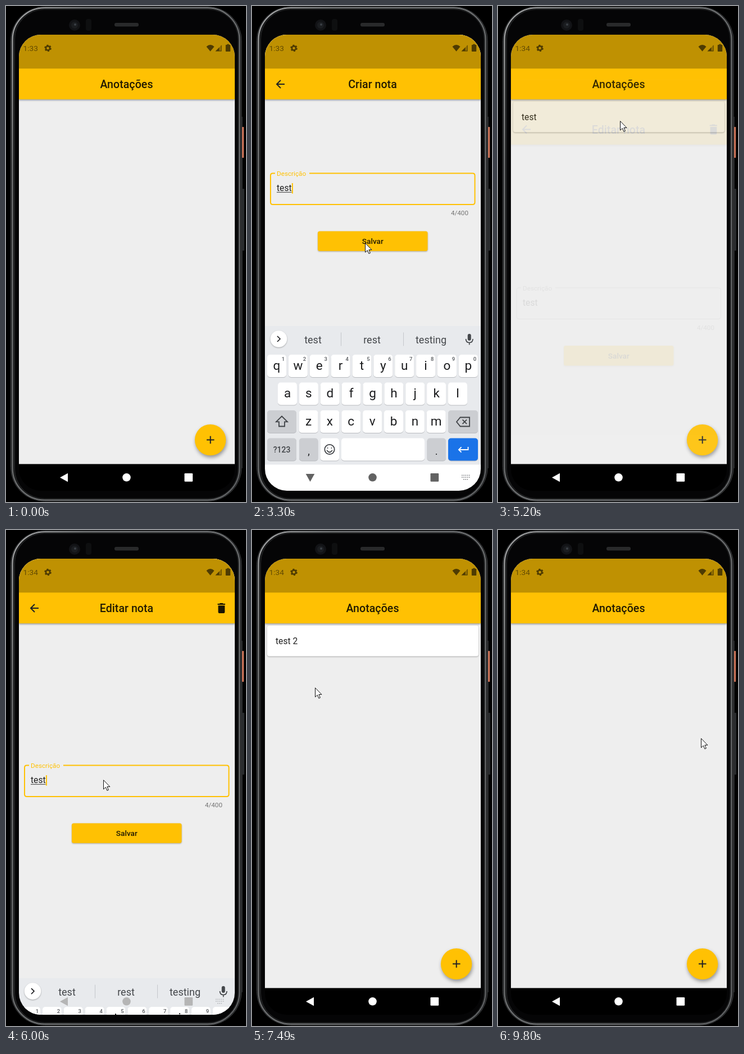
Animation of 427 by 882 pixels, one loop 9.88 s. Source, as an HTML page:

```html
<!DOCTYPE html>
<html lang="pt">
<head>
<meta charset="utf-8">
<title>Anotações</title>
<style>
  html, body { margin: 0; width: 100%; height: 100%; overflow: hidden; background: #000; }
  svg { display: block; width: 100%; height: 100%; font-family: Roboto, "Noto Sans", sans-serif; }
  filter { color-interpolation-filters: sRGB; }
  .title { font-size: 19.5px; font-weight: 500; letter-spacing: .08px; text-anchor: middle; fill: #231b02; }
  .body { font-size: 15.63px; fill: #222; }
  .small { font-size: 11.7px; fill: #757575; text-anchor: end; }
  .amber { fill: #ffc103; }
  .line { fill: none; stroke: #202124; stroke-width: 2; }
  .key { font-size: 22.5px; text-anchor: middle; fill: #1b1c1e; }
  .digit { font-size: 9.5px; font-weight: 500; text-anchor: middle; fill: #55585c; }
  .hint { font-size: 18px; text-anchor: middle; fill: #44474b; }
</style>
</head>
<body>
<svg viewBox="0 0 427 882" xmlns="http://www.w3.org/2000/svg">
  <defs>
    <clipPath id="screen"><rect x="23" y="51" width="384" height="811" rx="39"/></clipPath>
    <clipPath id="content"><rect x="23" y="51" width="384" height="763.5"/></clipPath>
    <filter id="low" x="-10%" y="-20%" width="120%" height="160%">
      <feDropShadow dx="0" dy="1" stdDeviation="1.2" flood-opacity=".3"/>
    </filter>
    <filter id="bar" x="-5%" y="-10%" width="110%" height="130%">
      <feDropShadow dx="0" dy="1.6" stdDeviation="1.7" flood-opacity=".36"/>
    </filter>
    <filter id="high" x="-30%" y="-30%" width="170%" height="170%">
      <feDropShadow dx="1.2" dy="3.6" stdDeviation="3" flood-opacity=".38"/>
    </filter>
    <linearGradient id="rim" x1="0" x2="1" y1="0" y2="1">
      <stop offset="0" stop-color="#b4b5b6"/><stop offset=".16" stop-color="#7d7f80"/>
      <stop offset="1" stop-color="#66686a"/>
    </linearGradient>
  </defs>

  <!-- Phone body -->
  <rect width="427" height="882"/>
  <rect x="419" y="197" width="2" height="625" fill="#222325"/>
  <rect x="420" y="215" width="3.2" height="55" rx="1" fill="#cb7358"/>
  <rect x="420" y="325" width="4" height="110" rx="1" fill="#292b2d"/>
  <rect x="8.5" y="1.5" width="410.5" height="879" rx="60" fill="#1c1d1e" stroke="#414345"/>
  <rect x="11.5" y="3.2" width="404" height="875.3" rx="57" fill="none" stroke="url(#rim)" stroke-width="2"/>
  <rect x="15.5" y="6" width="397.5" height="870" rx="53" fill="#050506" stroke="#232425"/>
  <circle cx="122" cy="34" r="10" fill="#121316"/>
  <circle cx="122" cy="34" r="6" fill="#1b1d20"/>
  <circle cx="123" cy="33" r="2" fill="#3a3f45"/>
  <rect x="142" y="23" width="10" height="21" rx="4" fill="#0e0f10"/>
  <rect x="193" y="30" width="43" height="6.5" rx="3" fill="#292a2b"/>

  <g clip-path="url(#screen)">
    <rect x="23" y="51" width="384" height="811"/>
    <g clip-path="url(#content)">
      <!-- List page -->
      <rect x="23" y="51" width="384" height="764" fill="#eee"/>
      <g id="card">
        <rect id="cardBox" x="27" y="170" width="376" height="54.5" rx="4" fill="#fff" filter="url(#low)"/>
        <text id="cardText" class="body" x="42" y="203"></text>
      </g>
      <rect class="amber" x="23" y="51" width="384" height="115" filter="url(#bar)"/>
      <text class="title" x="214.5" y="146">Anotações</text>
      <circle class="amber" cx="363.6" cy="771.6" r="27.7" filter="url(#high)"/>
      <path class="line" d="M357 771.5h13.5M363.7 764.8v13.5"/>

      <!-- Editor page -->
      <g id="editor">
        <rect x="23" y="51" width="384" height="764" fill="#eee"/>
        <rect class="amber" x="23" y="51" width="384" height="115" filter="url(#bar)"/>
        <path class="line" d="M58 139H44M51 132l-7 7 7 7"/>
        <text id="editorTitle" class="title" x="214.5" y="146"></text>
        <g id="trash">
          <circle id="trashInk" cx="383" cy="139" r="34" fill-opacity=".1"/>
          <path d="M376.5 133v-2h3.4l1-1h4.6l1 1h3.4v2zM377.5 134.3h11.8v11.7q0 2-2 2h-7.8q-2 0-2-2z" fill="#1a1502"/>
        </g>
        <g id="form">
          <path id="border" fill="none"/>
          <text id="label" x="0" y="0" font-size="15.63">Descrição</text>
          <text id="value" class="body" x="44" y="32.3" xml:space="preserve" style="white-space:pre"></text>
          <rect id="underline" y="33.7" height="1" fill="#333"/>
          <rect id="caret" y="18" width="2" height="18.5" class="amber"/>
          <text id="count" class="small" x="385" y="75.3"></text>
          <g id="save">
            <rect class="amber" x="117" y="103.5" width="195.5" height="35.3" rx="3.5" filter="url(#low)"/>
            <text x="214.8" y="126" font-size="13.67" font-weight="500" text-anchor="middle" fill="#211a02">Salvar</text>
          </g>
        </g>
      </g>
    </g>

    <!-- Status bar -->
    <rect x="23" y="51" width="384" height="60.3" fill-opacity=".25"/>
    <g fill="#4e3b02">
      <text id="clock" x="30.5" y="80" font-size="13.7" fill="#624a03"></text>
      <g fill="none" stroke="#4e3b02">
        <circle cx="74.5" cy="75" r="3.6" stroke-width="2.6"/>
        <circle cx="74.5" cy="75" r="5.3" stroke-width="2" stroke-dasharray="2.9 2.65"/>
      </g>
      <path d="M356.5 72.2q7-6.5 14 0l-7 8.6z"/>
      <path d="M372.5 80.5l11-11v11z" fill-opacity=".35"/>
      <path d="M372.5 80.5l7-7v7zM382.5 70.5l1-1v11h-7v-1h6z"/>
      <path d="M393.3 69v-1.2h3.4V69h1.8q.7 0 .7.8V80q0 .9-.8.9h-6.8q-.8 0-.8-.9V69.8q0-.8.7-.8z"/>
    </g>

    <!-- Keyboard -->
    <g id="keyboard">
      <rect x="23" y="569" width="384" height="247" fill="#e8eaed"/>
      <rect x="23" y="815.5" width="384" height="47" fill="#fff"/>
      <circle cx="47.5" cy="592" r="14.8" fill="#fff" filter="url(#low)"/>
      <path class="line" d="M45 587l5 5-5 5" style="stroke-width:1.7"/>
      <path d="M158.5 580.5v24M269.5 580.5v24" stroke="#c4c7cb"/>
      <g id="hints"></g>
      <rect x="383.7" y="583" width="6" height="12" rx="3" fill="#44474b"/>
      <path class="line" d="M380.5 592q0 6.5 6.2 6.5t6.2-6.5M386.7 598.5v4" style="stroke:#44474b;stroke-width:1.7"/>
      <g id="keys"></g>
      <g class="line" style="stroke:#3f4246;stroke-width:1.8">
        <path d="M53 729.5l10 9.8h-5v8.2H48v-8.2h-5z"/>
        <path d="M370.5 731.5h16.5v16h-16.5l-6.5-8zM374.5 735.7l7.5 7.5M382 735.7l-7.5 7.5"/>
        <circle cx="138" cy="788.5" r="8.7"/>
        <path d="M133.5 790.5q4.5 6 9 0M134.6 786v.1M141.4 786v.1" stroke-linecap="round"/>
        <path d="M384.5 784v5H368M372.5 784.3l-4.7 4.7 4.7 4.7" style="stroke:#fff"/>
      </g>
    </g>

    <!-- Navigation bar -->
    <g id="nav">
      <path id="back" d="M96 838.5l14-7.8v15.6z"/>
      <circle cx="214.5" cy="838.3" r="7.3"/>
      <rect x="317.5" y="831" width="14.7" height="14.7" rx="1.3"/>
      <path id="dots" d="M373 834.5h15M373 838h15M376 841.8h9" fill="none" stroke="#7a7c80" stroke-width="1.6" stroke-dasharray="1.7 1.5"/>
    </g>
  </g>

  <g id="pointer">
    <circle id="halo" r="12" fill="#f7f45a" fill-opacity=".82"/>
    <path d="M.5.7V17l3.8-3.6 2.6 5.9 2.5-1.1-2.5-5.7h5z" fill="#fff" stroke="#111"/>
  </g>
</svg>

<script>
const LOOP = 9880, FRAME = 80;
const el = {};
document.querySelectorAll('[id]').forEach(node => el[node.id] = node);

const set = (node, attrs) => {
  for (const name in attrs) node.setAttribute(name, attrs[name]);
};
const add = (parent, tag, attrs, text = '') => {
  const node = document.createElementNS('http://www.w3.org/2000/svg', tag);
  set(node, attrs);
  node.textContent = text;
  parent.appendChild(node);
  return node;
};
const show = (node, on) => { node.style.display = on ? '' : 'none'; };
const mix = (a, b, p) => a + (b - a) * p;
const ramp = (t, from, to) => Math.min(1, Math.max(0, (t - from) / (to - from)));
const smooth = p => p * p * (3 - 2 * p);
const within = (t, spans) => spans.some(([from, to]) => t >= from && t < to);
const latest = (t, list) => list.filter(item => item[0] <= t).pop();
// Rises over [a, b] and falls over [c, d] for each span.
const pulse = (t, spans) =>
  Math.max(...spans.map(([a, b, c, d]) => smooth(ramp(t, a, b)) * (1 - smooth(ramp(t, c, d)))));

// Periods of motion; the picture holds still between them.
const ACTIVE = [
  [0, 0], [140, 380], [690, 1490], [1640, 2440], [2590, 2670], [2900, 3300], [3460, 3460],
  [3610, 4170], [4480, 4880], [5040, 6000], [6080, 6320], [6550, 7490], [7570, 7890],
  [8040, 9000], [9160, 9800]
];
const POINTER = [
  [140, 366, 860], [380, 361, 779], [1090, 361, 779], [1490, 185, 479], [2900, 185, 479],
  [3220, 201, 421], [4400, 201, 421], [4880, 217, 204], [5360, 217, 204], [5760, 173, 444],
  [6630, 173, 444], [6870, 180, 421], [7190, 180, 421], [7490, 112, 280], [7890, 74, 197],
  [8440, 74, 197], [9000, 383, 139], [9400, 383, 139], [9800, 361, 370]
];
const CLICKS = [690, 1640, 3610, 5040, 5840, 6870, 8040, 9160];
const PAGES = [[770, 1090, 3770, 4090], [5120, 5440, 6950, 7270], [8120, 8440, 9240, 9560]];
const KEYBOARD = [[1720, 2180, 3690, 4115], [5860, 6320, 6910, 7330]];
const FOCUS = [[1680, 1880, 4200, 4201], [5840, 6000, 8000, 8001]];
const TYPED = [
  [0, ''], [2360, 't'], [2590, 'te'], [2900, 'tes'], [3060, 'test'], [6550, 'test '], [6630, 'test 2']
];
const HINTS = {
  '': ['I', 'the', 'you'], t: ['the', 'to', 'this'], te: ['te', 'tell', 'text'],
  tes: ['tes', 'test', 'tests'], test: ['test', 'rest', 'testing'],
  'test ': ['the', 'is', 'and'], 'test 2': ['2', '20', '2nd']
};

function buildKeyboard() {
  const key = (x, y, width, fill = '#fff') => {
    add(el.keys, 'rect', { x, y: y + 1, width, height: 40, rx: 5, fill: '#b9bbbf' });
    add(el.keys, 'rect', { x, y, width, height: 40, rx: 5, fill });
  };
  const letter = (x, y, text) => add(el.keys, 'text', { x, y, class: 'key' }, text);
  [['qwertyuiop', 44, 620], ['asdfghjkl', 63, 669.5], ['zxcvbnm', 100.5, 719]].forEach(([row, x0, y]) => {
    [...row].forEach((char, i) => {
      const x = x0 + i * 37.87;
      key(x - 17, y, 34);
      letter(x, y + 26.5, char);
      if (y === 620) add(el.keys, 'text', { x: x + 11.5, y: 631, class: 'digit' }, (i + 1) % 10);
    });
  });
  const grey = '#ccced2';
  key(27, 719, 52, grey);
  key(349, 719, 53, grey);
  key(27, 768.5, 52, grey);
  key(84, 768.5, 33.5, grey);
  key(121.5, 768.5, 33.5);
  key(159, 768.5, 148);
  key(311.5, 768.5, 33.5, grey);
  key(349, 768.5, 53, '#1a73e8');
  set(letter(53, 794, '?123'), { style: 'font-size:14px;font-weight:500;fill:#3f4246' });
  set(letter(101, 798, ','), { style: 'font-size:18px' });
  set(letter(328, 798, '.'), { style: 'font-size:18px' });
}
buildKeyboard();
const hintTexts = [108.5, 213.5, 318.5].map(x => add(el.hints, 'text', { x, y: 599.5, class: 'hint' }));

function stepped(t) {
  const [from, to] = latest(t, ACTIVE);
  return t >= to ? to : from + Math.floor((t - from) / FRAME) * FRAME;
}

function drawPointer(t) {
  show(el.pointer, t >= 140);
  const i = POINTER.findIndex(point => point[0] > t);
  const b = i < 0 ? POINTER[POINTER.length - 1] : POINTER[i];
  const a = i > 0 ? POINTER[i - 1] : b;
  const p = a === b ? 1 : smooth(ramp(t, a[0], b[0]));
  const x = Math.round(mix(a[1], b[1], p)), y = Math.round(mix(a[2], b[2], p));
  set(el.pointer, { transform: `translate(${x} ${y})` });
  show(el.halo, within(t, CLICKS.map(c => [c, c + 160])));
}

function drawField(t, text) {
  const focus = pulse(t, FOCUS), focused = focus > 0;
  const float = text ? 1 : focus;
  const gap = mix(0, 30.5, float);
  set(el.border, {
    d: `M${71.5 + gap} .5H392.5q4 0 4 4V52q0 4-4 4H37q-4 0-4-4V4.5q0-4 4-4H${71.5 - gap}`,
    stroke: focused ? '#ffc103' : '#9e9e9e',
    'stroke-width': mix(1, 2, focus)
  });
  set(el.label, {
    transform: `translate(44 ${mix(33.5, 5.2, float)}) scale(${mix(1, .75, float)})`,
    fill: focused ? '#ffc103' : '#757575'
  });

  el.value.textContent = text;
  const width = text ? el.value.getComputedTextLength() : 0;
  const start = text.lastIndexOf(' ') + 1;
  const before = start ? el.value.getSubStringLength(0, start) : 0;
  show(el.underline, focused && start < text.length);
  set(el.underline, { x: 44 + before, width: Math.max(0, width - before) });
  show(el.caret, focused && !within(t, [[3460, 3610]]));
  set(el.caret, { x: 44 + width + .3 });
  el.count.textContent = text.length + '/400';
  show(el.save, text);
}

function drawKeyboard(t) {
  const up = pulse(t, KEYBOARD);
  show(el.keyboard, up > 0);
  set(el.keyboard, { transform: `translate(0 ${293 * (1 - up)})` });
  const hints = HINTS[latest(t - FRAME, TYPED)?.[1] ?? ''];
  hintTexts.forEach((node, i) => { node.textContent = hints[i]; });

  const shade = Math.round(mix(255, 98, Math.sqrt(up)));
  set(el.nav, { fill: `rgb(${shade},${shade},${shade})` });
  set(el.back, { transform: `rotate(${-90 * smooth(ramp(up, .3, 1))} 103.5 838.5)` });
  set(el.dots, { opacity: Math.sqrt(up) });
}

function render(now) {
  const t = stepped(now % LOOP);
  const text = latest(t, TYPED)[1];
  const editing = t > 4500;

  const page = Math.max(...PAGES.map(([a, b, c, d]) => ramp(t, a, b) * (1 - ramp(t, c, d))));
  show(el.editor, page > 0);
  set(el.editor, {
    transform: `translate(0 ${191 * (1 - page) ** 3})`,
    opacity: page ** 1.7
  });
  el.editorTitle.textContent = editing ? 'Editar nota' : 'Criar nota';
  show(el.trash, editing);
  show(el.trashInk, within(t, [[9160, 9560]]));

  show(el.card, within(t, [[3700, 9240]]));
  el.cardText.textContent = t < 6900 ? 'test' : 'test 2';
  set(el.cardBox, { fill: within(t, [[5040, 5440], [8040, 8440]]) ? '#f0f0f0' : '#fff' });
  el.clock.textContent = t < 5200 ? '1:33' : '1:34';

  // The form follows the keyboard slightly late.
  const inset = Math.max(0, 293 * pulse(t - 18, KEYBOARD) - 47);
  set(el.form, { transform: `translate(0 ${(text ? 420 : 442) - inset / 2})` });
  if (page > 0) drawField(t, text);
  drawKeyboard(t);
  drawPointer(t);
}

const began = performance.now();
function tick() {
  render(performance.now() - began);
  requestAnimationFrame(tick);
}
tick();
</script>
</body>
</html>
```
